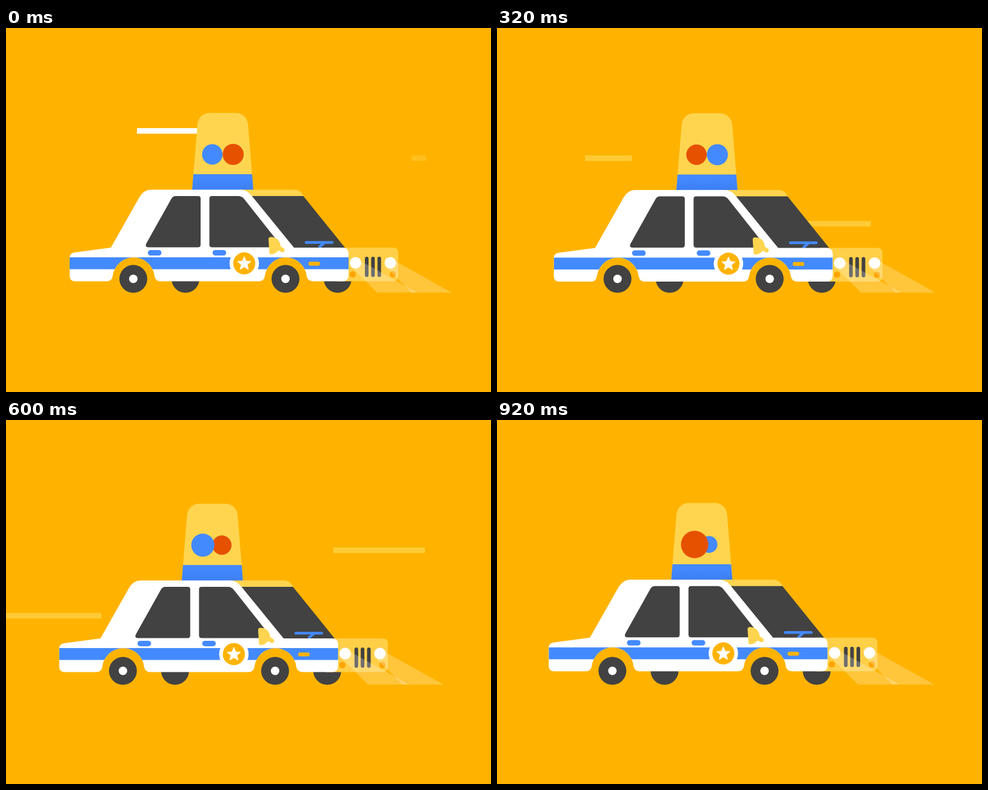
These frames come from a looping animation (800x600 px, 0.96 s). An HTML page:

```html
<!DOCTYPE html>
<html lang="en">
<head>
<meta charset="utf-8">
<title>Patrol car</title>
<style>
  html, body { margin: 0; width: 100%; height: 100%; overflow: hidden; background: #ffb300; }
  svg { display: block; width: 100vw; height: 100vh; }
  .dark { fill: #424242; }
  .blue { fill: #448aff; }
  .red { fill: #e65100; }
  .white { fill: #fff; }
  .pale { fill: #ffd54f; }
  .amber { fill: #ffb300; }
  .streak { fill: #ffca36; }
</style>
</head>
<body>
<svg viewBox="0 0 800 600">
  <defs>
    <linearGradient id="shade" x1="0" y1="0" x2="0" y2="1">
      <stop offset=".2" stop-color="#448aff"/>
      <stop offset="1" stop-color="#3d7ff2"/>
    </linearGradient>
    <clipPath id="ground"><rect width="800" height="436"/></clipPath>
    <clipPath id="shell"><use href="#bodyShape"/></clipPath>
  </defs>

  <rect class="amber" width="800" height="600"/>
  <g id="streaks"></g>

  <g id="farWheels" class="dark">
    <circle cx="296" cy="413.5" r="23"/>
    <circle cx="547" cy="413.5" r="23"/>
  </g>

  <g id="car">
    <path class="pale" d="M307 267 L315.7 160 C316.8 147 325 140 337 140 H378 C390 140 398.2 147 399.3 160 L408 267 Z"/>
    <path fill="url(#shade)" d="M309.1 241 H405.9 L408 267 H307 Z"/>
    <g id="lights">
      <circle id="redLight" class="red"/>
      <circle id="blueLight" class="blue"/>
    </g>

    <path class="pale" d="M385 266.5 H476 Q486 266.5 491 277.5 H400 Z"/>
    <path class="dark" d="M400 277 H490.5 L559.5 362.5 H470 Z"/>
    <g fill="none" stroke="#448aff" stroke-width="4.4" stroke-linecap="round">
      <path d="M495 353.5 H538"/>
      <path d="M525 354 L516 362" stroke-linecap="butt"/>
    </g>

    <path fill="#ffcf48" d="M545 362 H638 Q647 362 647 371 V408.500 Q647 417.500 638 417.500 H545 Z"/>
    <g fill="#ffa505">
      <circle cx="572" cy="406" r="5.3"/>
      <circle cx="638" cy="406" r="5.3"/>
    </g>
    <g class="dark">
      <rect x="592" y="377" width="6" height="33.500" rx="3"/>
      <rect x="602.3" y="377" width="6" height="33.500" rx="3"/>
      <rect x="612.700" y="377" width="6" height="33.500" rx="3"/>
    </g>
    <g class="white">
      <circle cx="576.500" cy="387" r="9.6"/>
      <circle cx="634" cy="387" r="9.6"/>
    </g>

    <path id="bodyShape" class="white" d="M105 378 Q105 371.500 113 370 L173 362 L220 279
      Q227.500 266.500 239 266.500 H386 Q397 266.500 404 275 L475 362 H555 Q565 362 565 372 V407.500
      Q565 417.500 555 417.500 H507 Q497.500 417.500 496 409 A34.700 34.700 0 0 0 427 409
      Q425.500 417.500 417 417.500 H255 Q246.500 417.500 245 409 A34.700 34.700 0 0 0 176 409
      Q174.500 417.500 166 417.500 H114 Q105 417.500 105 408.500 Z"/>
    <rect class="blue" x="100" y="378" width="470" height="19.600" clip-path="url(#shell)"/>

    <g class="dark">
      <path d="M280 277 H317 Q321 277 321 281 V357 Q321 361.500 316.500 361.500 H235 Q228.500 361.500 231.500 355 L273 281 Q275.500 277 280 277 Z"/>
      <path d="M339.500 277 H383 Q389 277 393 282 L446 349 Q453 361.500 443 361.500 H340 Q335.500 361.500 335.500 357 V281 Q335.500 277 339.500 277 Z"/>
    </g>
    <path class="pale" d="M433 348 Q433 344.500 437 344.500 Q446 344.500 450 351 Q453 355 453 360 L458 363 Q460.500 365 459 368 Q457.500 370.500 454 369 L449.500 366.500 Q445 372.500 437 373 Q434.500 373 434.500 370 Z"/>
    <g class="blue">
      <rect x="234" y="366" width="22.500" height="9" rx="4.500"/>
      <rect x="340.700" y="366" width="22.500" height="9" rx="4.500"/>
    </g>
    <rect class="amber" x="499" y="385.300" width="19" height="6.400" rx="3.200"/>
    <circle class="white" cx="393" cy="388" r="24.300"/>
    <circle class="amber" cx="393" cy="388" r="18.200"/>
    <path id="star" class="white" stroke="#fff" stroke-linejoin="round"/>
  </g>

  <g clip-path="url(#ground)">
    <g id="beams" class="white" fill-opacity=".23">
      <path d="M568 392 L583 383 L696 446 H622 Z"/>
      <path d="M625 392 L640 383 L753 446 H679 Z"/>
    </g>
  </g>

  <g id="nearWheels"></g>
</svg>

<script>
const LOOP = 960, STEP = 40;
const $ = id => document.getElementById(id);
const ease = u => u * u * (3 - 2 * u);
const clamp = u => Math.min(1, Math.max(0, u));

function add(parent, tag, attrs) {
  const el = document.createElementNS("http://www.w3.org/2000/svg", tag);
  set(el, attrs);
  return parent.appendChild(el);
}
function set(el, attrs) {
  for (const k in attrs) el.setAttribute(k, attrs[k]);
}
function move(id, x, y) {
  set($(id), { transform: `translate(${x.toFixed(2)} ${y.toFixed(2)})` });
}

for (const x of [210, 461]) {
  add($("nearWheels"), "circle", { class: "dark", cx: x, cy: 413.5, r: 23 });
  add($("nearWheels"), "circle", { class: "white", cx: x, cy: 413.5, r: 7 });
}

const tips = Array.from({ length: 10 }, (_, i) => {
  const a = (i / 5 - 0.5) * Math.PI, r = i % 2 ? 5.2 : 11.6;
  return `${393 + r * Math.cos(a)} ${388.5 + r * Math.sin(a)}`;
});
set($("star"), { d: `M${tips.join("L")}Z` });

// Each streak: both ends at time `at`, with their speeds in px per ms
const streaks = [
  { y: 165, at: 0, left: 216, right: 324, vl: 1.96, vr: 1.758, kind: "white" },
  { y: 210, at: 0, left: 669, right: 693, vl: 1.637, vr: 1.47, kind: "streak", fade: 100 },
  { y: 318, at: 480, left: 133, right: 354, vl: 1.8, vr: 1.642, kind: "streak" },
  { y: 210, at: 680, left: 340, right: 505, vl: 2.5, vr: 2.325, kind: "streak" }
];
for (const s of streaks) s.el = add($("streaks"), "rect", { class: s.kind, y: s.y, height: 9.2 });

function drawStreak(s, t) {
  const left = s.left - s.vl * (t - s.at);
  const right = s.right - s.vr * (t - s.at);
  set(s.el, {
    x: left,
    width: Math.max(0, right - left),
    opacity: s.fade ? 0.55 + 0.45 * clamp(t / s.fade) : 1
  });
}

const hops = [[0, 0], [130, -3.2], [325, 0.5], [525, -3], [740, 0.3], [950, -3.4], [1150, 0]];
function bounce(t) {
  const i = hops.findIndex(h => h[0] > t);
  const [t0, y0] = hops[i - 1], [t1, y1] = hops[i];
  return y0 + (y1 - y0) * ease((t - t0) / (t1 - t0));
}

// The two lamps swap sides in half turns, the nearer one growing
const turns = [0, 320, 680];
function drawLights(t) {
  const n = turns.filter(s => s <= t).length - 1;
  const u = clamp((t - turns[n]) / 320);
  const x = 17.2 * (1 - 2 * ease(u));
  const grow = ease(1 - Math.abs(2 * u - 1));
  const pair = [$("redLight"), $("blueLight")];
  const [front, back] = n % 2 ? pair.reverse() : pair;
  set(front, { cx: 357.5 + x, cy: 208.4, r: 17.4 + 10.4 * grow });
  set(back, { cx: 357.5 - x, cy: 208.4, r: 16.9 - 6 * grow });
  if ($("lights").lastElementChild !== front) $("lights").appendChild(front);
}

function draw(t) {
  const x = -19.7 * (1 - Math.pow(1 - t / LOOP, 2.08));
  const y = bounce(t);
  move("farWheels", x, 0);
  move("nearWheels", x, 0);
  move("car", x, y);
  move("beams", x, y);
  drawLights(t);
  streaks.forEach(s => drawStreak(s, t));
}

const start = performance.now();
function tick() {
  const t = (performance.now() - start) % LOOP;
  draw(Math.floor(t / STEP) * STEP);
  requestAnimationFrame(tick);
}
tick();
</script>
</body>
</html>
```
